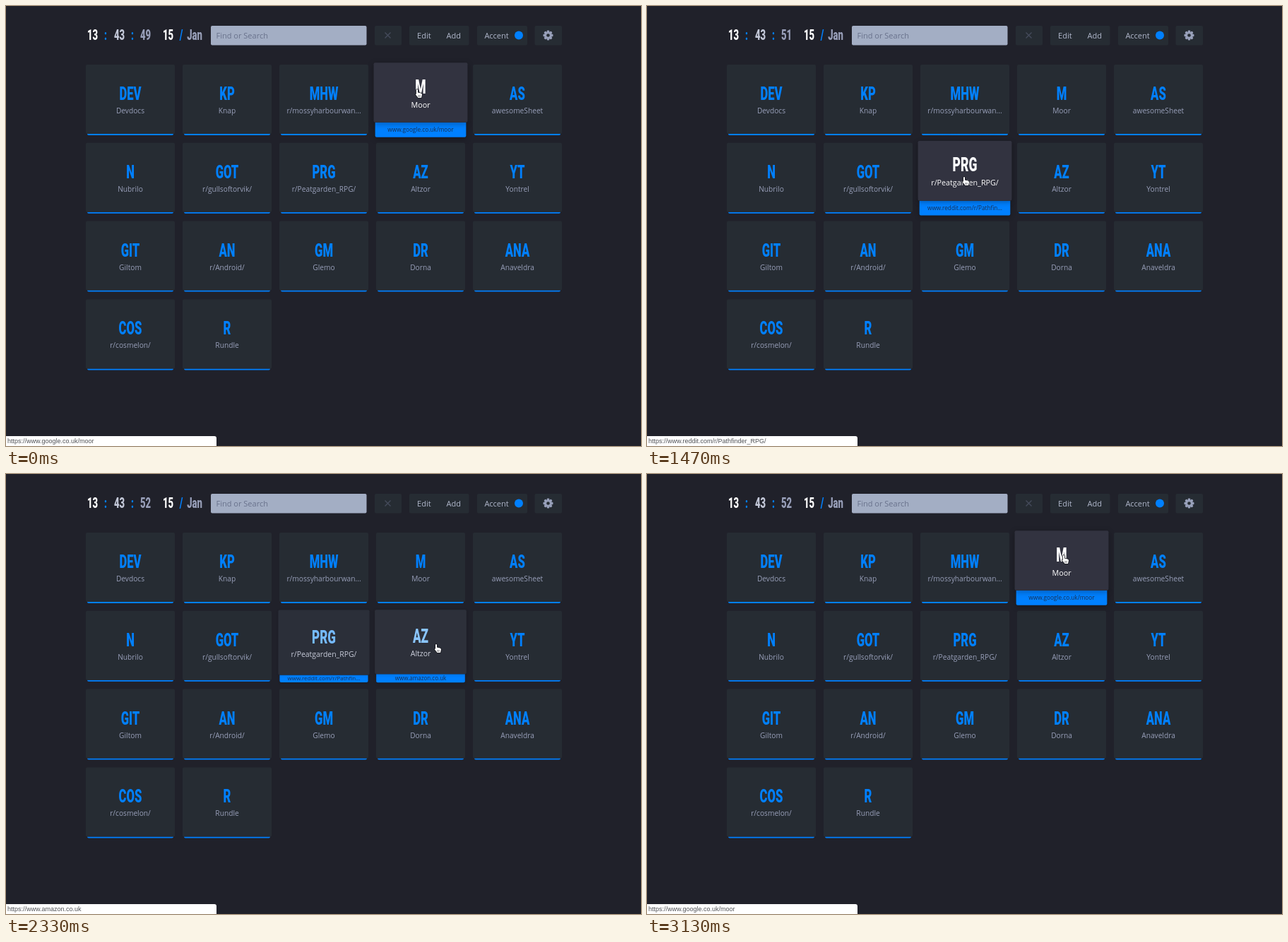
Recreate the animation shown at these times as an HTML page with a canvas. Size 899x623 px, loop 3190 ms.

```html
<!DOCTYPE html>
<html lang="en">
<head>
<meta charset="utf-8">
<title>Start page</title>
<style>
html, body { margin: 0; width: 100%; height: 100%; overflow: hidden; background: #20212a; }
canvas { display: block; }
</style>
</head>
<body>
<canvas id="stage" width="899" height="623"></canvas>
<script>
const ctx = document.getElementById('stage').getContext('2d');
const LOOP = 3190, FADE = 200;
const BLUE = [0, 128, 255], WHITE = [255, 255, 255], LAVENDER = [152, 159, 185];
const CARD = [38, 44, 51], CARD_HOVER = [50, 51, 64];
const BODY = '"Open Sans", sans-serif';

const tiles = [
  ['DEV', 'Devdocs'], ['KP', 'Knap'], ['MHW', 'r/mossyharbourwan...', 'www.reddit.com/r/mossyh...'],
  ['M', 'Moor', 'www.google.co.uk/moor'], ['AS', 'awesomeSheet'],
  ['N', 'Nubrilo'], ['GOT', 'r/gullsoftorvik/'], ['PRG', 'r/Peatgarden_RPG/', 'www.reddit.com/r/Pathfin...'],
  ['AZ', 'Altzor', 'www.amazon.co.uk'], ['YT', 'Yontrel'],
  ['GIT', 'Giltom'], ['AN', 'r/Android/'], ['GM', 'Glemo'], ['DR', 'Dorna'], ['ANA', 'Anaveldra'],
  ['COS', 'r/cosmelon/'], ['R', 'Rundle']
].map(([code, name, url], i) => ({
  code, name, url, index: i, x: 113 + 137 * (i % 5), y: 83 + 110.8 * Math.floor(i / 5)
}));

// Which tile is hovered, from when, and the address in the status bar
const hovers = [
  { at: -FADE, tile: 3, link: 'www.google.co.uk/moor' },
  { at: 630, tile: 2, link: 'www.reddit.com/r/mossyharbourwander/' },
  { at: 1300, tile: 7, link: 'www.reddit.com/r/Pathfinder_RPG/' },
  { at: 2268, tile: 8, link: 'www.amazon.co.uk' },
  { at: 2910, tile: 3, link: 'www.google.co.uk/moor' }
];

// Pointer moves: start, end, destination
const home = [581, 118];
const moves = [
  [540, 700, 443, 125], [1210, 1390, 448, 242], [2150, 2330, 608, 241], [2820, 3000, 589, 115]
];

const clamp = v => Math.min(1, Math.max(0, v));
const lerp = (a, b, p) => a + (b - a) * p;
const mix = (a, b, p) => `rgb(${a.map((v, i) => Math.round(lerp(v, b[i], p)))})`;
const smooth = v => v * v * (3 - 2 * v);

// CSS "ease": cubic-bezier(.25, .1, .25, 1)
function ease(x) {
  const bezier = (a, b, u) => 3 * a * u * (1 - u) ** 2 + 3 * b * u * u * (1 - u) + u ** 3;
  let low = 0, high = 1;
  for (let i = 0; i < 16; i++) {
    const mid = (low + high) / 2;
    if (bezier(.25, .25, mid) < x) low = mid; else high = mid;
  }
  return x <= 0 ? 0 : x >= 1 ? 1 : bezier(.1, 1, low);
}

function box(x, y, w, h, color, radius = 2) {
  ctx.fillStyle = color;
  ctx.beginPath();
  ctx.roundRect(x, y, w, h, radius);
  ctx.fill();
}

function disc(x, y, r, color) {
  ctx.fillStyle = color;
  ctx.beginPath();
  ctx.arc(x, y, r, 0, 7);
  ctx.fill();
}

function text(str, x, y, size, color, align = 'center', family = BODY) {
  ctx.font = `${size}px ${family}`;
  ctx.textAlign = align;
  ctx.fillStyle = color;
  ctx.fillText(str, x, y);
}

// Condensed display face
function display(str, x, y, size, color) {
  ctx.save();
  ctx.translate(x, y);
  ctx.scale(.64, 1);
  ctx.font = `900 ${size}px Roboto, sans-serif`;
  ctx.textAlign = 'center';
  ctx.fillStyle = color;
  ctx.fillText(str, 0, 0);
  ctx.restore();
}

function hoverAmount(index, t) {
  return hovers.reduce((p, hover, i) => {
    if (hover.tile !== index) return p;
    const next = hovers[i + 1];
    const out = next ? ease((t - next.at) / FADE) : 0;
    return Math.max(p, ease((t - hover.at) / FADE) - out);
  }, 0);
}

function drawTile({ code, name, url, x, y }, p) {
  const strip = 2 + 18 * p, top = 100 - strip, scale = 1 + .055 * p, lift = -9 * p;
  ctx.save();
  ctx.translate(x + 63, y + 50);
  ctx.scale(scale, scale);
  ctx.translate(-63, -50);
  ctx.shadowColor = `rgba(0,0,0,${.3 * p})`;
  ctx.shadowBlur = 8 * p;
  ctx.shadowOffsetY = 2 * p;
  box(2, top, 122, strip, mix(BLUE, BLUE, 0), [0, 0, 2, 2]);
  box(0, 0, 126, top, mix(CARD, CARD_HOVER, p));
  ctx.shadowColor = 'transparent';
  display(code, 63, 50 + lift, 26, mix(BLUE, WHITE, p));
  text(name, 63, 69 + lift, 10.2, mix(LAVENDER, WHITE, p));
  if (p > 0) {
    ctx.beginPath();
    ctx.rect(2, top, 122, strip);
    ctx.clip();
    text(url, 63, top + strip / 2 + 2.6, 7.8, `rgba(28,34,52,${clamp(p * 4) * .85})`);
  }
  ctx.restore();
}

function drawGear(x, y) {
  ctx.save();
  ctx.translate(x, y);
  for (let i = 0; i < 8; i++) {
    box(-1.7, -7, 3.4, 4, '#98a0ba', 1);
    ctx.rotate(Math.PI / 4);
  }
  disc(0, 0, 5.3, '#98a0ba');
  disc(0, 0, 2.3, '#262c33');
  ctx.restore();
}

function drawHeader(t) {
  const seconds = 49 + [200, 1200, 2200].filter(at => t >= at).length;
  const parts = [
    ['13', 122.5, '#fff'], [':', 141, '#0080ff'], ['43', 160.5, '#c3c8d8'], [':', 179, '#0080ff'],
    [seconds, 197.5, '#989fb9'], ['15', 229.5, '#fff'], ['/', 248, '#0080ff'], ['Jan', 267, '#989fb9']
  ];
  for (const [str, x, color] of parts) display(str, x, 48, 20.5, color);

  box(290, 28, 220.5, 27.5, '#a3aec4');
  text('Find or Search', 297.5, 45.5, 11, '#69728c', 'left');
  for (const [x, w] of [[522, 38], [571, 84.5], [667, 71], [748.5, 38.5]]) box(x, 28, w, 27.5, '#262c33');
  ctx.strokeStyle = '#454b5c';
  ctx.lineWidth = 1.3;
  ctx.stroke(new Path2D('M536.5 37.5l8 8m0-8l-8 8'));
  text('Edit', 591.8, 45.5, 11, '#b0b7cb');
  text('Add', 633.8, 45.5, 11, '#b0b7cb');
  text('Accent', 694.5, 45.5, 11, '#b0b7cb');
  disc(726, 41.5, 6, '#0080ff');
  drawGear(767.5, 41.5);
}

const hand = new Path2D('M0 1Q0 0 1 0T2 1V4.5L6.5 5.5Q8 6 8 7.5L7 12H2.5L-1 7.5Q-1.5 6 0 6.5Z');

function drawPointer(t) {
  let [x, y] = home;
  for (const [start, end, toX, toY] of moves) {
    const p = smooth(clamp((t - start) / (end - start)));
    x = lerp(x, toX, p);
    y = lerp(y, toY, p);
  }
  ctx.save();
  ctx.translate(x, y);
  ctx.lineWidth = 1.6;
  ctx.strokeStyle = '#15161c';
  ctx.stroke(hand);
  ctx.fillStyle = '#fff';
  ctx.fill(hand);
  ctx.lineWidth = .6;
  ctx.stroke(new Path2D('M3 8v3M5 8v3'));
  ctx.restore();
}

function draw(now) {
  const t = now % LOOP;
  ctx.fillStyle = '#20212a';
  ctx.fillRect(0, 0, 899, 623);
  drawHeader(t);
  tiles.map(tile => [tile, hoverAmount(tile.index, t)])
    .sort((a, b) => a[1] - b[1])
    .forEach(([tile, p]) => drawTile(tile, p));
  const { link } = hovers.filter(hover => t >= hover.at).pop();
  box(0, 609, 298, 14, '#fff', [0, 3, 0, 0]);
  text('https://' + link, 2, 619, 9, '#505256', 'left', '"Liberation Sans", sans-serif');
  drawPointer(t);
  requestAnimationFrame(() => draw(performance.now()));
}
draw(0);
</script>
</body>
</html>
```
